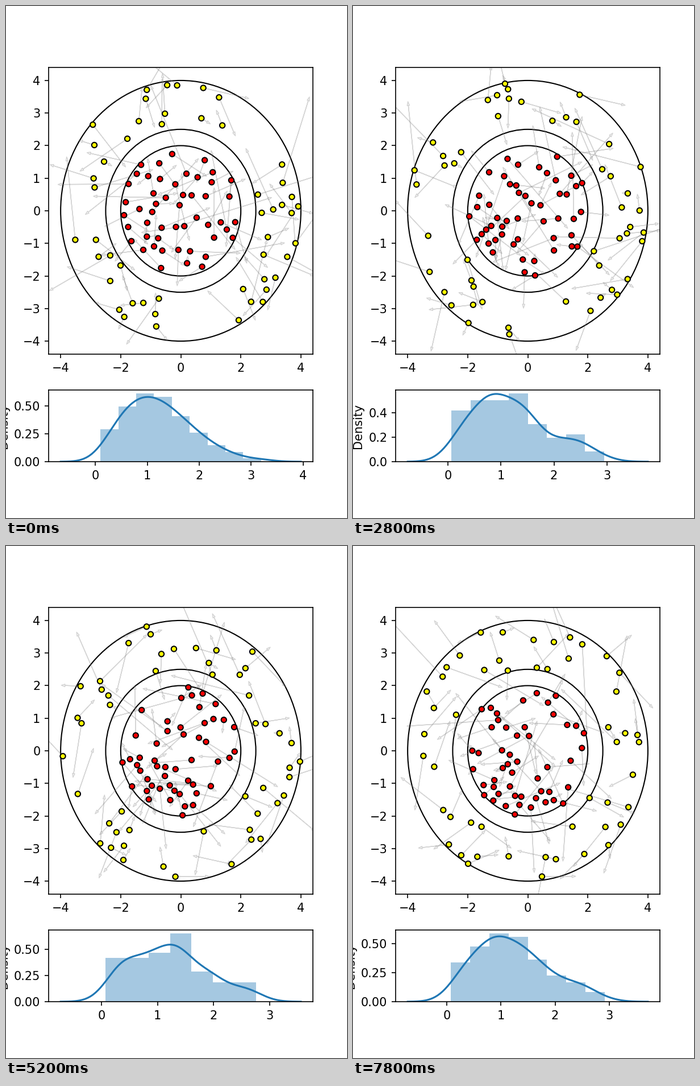
These frames come from a looping animation (600x900 px, 8 s). A matplotlib script:

```python
import numpy as np
import matplotlib.pyplot as plt
from matplotlib.animation import FuncAnimation
from matplotlib.collections import PolyCollection

FRAMES, INTERVAL = 40, 200
DT, SUBSTEPS = 0.05, 4
INNER, GAP, OUTER = 2.0, 2.5, 4.0
DIAMETER, SPACING = 0.2, 0.27
SPREAD = 0.98                       # speed scale of the gas
N_RED = 50
# Start sectors of the yellow gas: from angle, to angle, count.
SECTORS = [(-62, 35, 20), (45, 112, 10), (115, 170, 7), (194, 262, 13)]


def scatter_ring(rng, count, r_min, r_max, start=0, stop=360):
    """Spread points evenly over a ring sector, none too close together."""
    points = []
    while len(points) < count:
        r = np.sqrt(rng.uniform(r_min ** 2, r_max ** 2))
        a = np.radians(rng.uniform(start, stop))
        p = r * np.array([np.cos(a), np.sin(a)])
        if all(np.hypot(*(p - q)) > SPACING for q in points):
            points.append(p)
    return points


def start_state():
    rng = np.random.default_rng(4)
    points = scatter_ring(rng, N_RED, 0, 1.95)
    for start, stop, count in SECTORS:
        points += scatter_ring(rng, count, 2.55, 3.95, start, stop)
    pos = np.array(points)
    n = len(pos)
    # Evenly spaced quantiles of the Maxwell speed law in two dimensions.
    level = (rng.permutation(n) + 0.5) / n
    speed = SPREAD * np.sqrt(-2 * np.log(1 - level))
    heading = rng.uniform(0, 2 * np.pi, n)
    vel = speed[:, None] * np.stack([np.cos(heading), np.sin(heading)], axis=1)
    return pos, vel


def bounce_walls(pos, vel):
    r = np.hypot(*pos.T)
    normal = pos / r[:, None]
    radial = (vel * normal).sum(axis=1)
    red = np.arange(len(pos)) < N_RED
    leaving = (r > np.where(red, INNER, OUTER)) & (radial > 0)
    entering = ~red & (r < GAP) & (radial < 0)
    hit = leaving | entering
    vel[hit] -= 2 * radial[hit, None] * normal[hit]


def collide(pos, vel):
    diff = pos[:, None] - pos[None]
    dist = np.hypot(diff[..., 0], diff[..., 1])
    for i, j in np.argwhere(np.triu(dist < DIAMETER, 1)):
        normal = diff[i, j] / dist[i, j]
        closing = np.dot(vel[i] - vel[j], normal)
        if closing < 0:
            vel[i] -= closing * normal
            vel[j] += closing * normal


def simulate():
    pos, vel = start_state()
    states = []
    for _ in range(FRAMES):
        states.append((pos.copy(), vel.copy()))
        for _ in range(SUBSTEPS):
            pos += vel * DT / SUBSTEPS
            bounce_walls(pos, vel)
            collide(pos, vel)
    return states


def arrow_shapes(pos, vel, width=0.08, length=0.12):
    unit = vel / np.hypot(*vel.T)[:, None]
    side = unit[:, ::-1] * [-1, 1] * width / 2
    neck = pos + vel
    points = [pos, neck, neck + side, neck + unit * length, neck - side, neck]
    return np.stack(points, axis=1)


def bin_count(x):
    q1, q3 = np.percentile(x, [25, 75])
    width = 2 * (q3 - q1) / len(x) ** (1 / 3)
    return int(np.ceil(np.ptp(x) / width))


def density(x):
    bw = x.std(ddof=1) * len(x) ** -0.2
    grid = np.linspace(x.min() - 3 * bw, x.max() + 3 * bw, 200)
    z = (grid[:, None] - x) / bw
    return grid, np.exp(-z ** 2 / 2).mean(axis=1) / (bw * np.sqrt(2 * np.pi))


states = simulate()
fig, (ax, hist_ax) = plt.subplots(
    2, 1, figsize=(4, 6), dpi=150, gridspec_kw={"height_ratios": [4, 1]})

ax.set(xlim=(-4.4, 4.4), ylim=(-4.4, 4.4),
       xticks=range(-4, 5, 2), yticks=range(-4, 5))
for radius in (INNER, GAP, OUTER):
    ax.add_patch(plt.Circle((0, 0), radius, fill=False, lw=1))
arrows = PolyCollection([], facecolors=(0.5, 0.5, 0.5, 0.05),
                        edgecolors=(0.5, 0.5, 0.5, 0.32), linewidths=0.7)
ax.add_collection(arrows, autolim=False)
first = states[0][0]
dots = ax.scatter(*first.T, s=20, edgecolors="black", linewidths=1, zorder=2,
                  c=["red"] * N_RED + ["yellow"] * (len(first) - N_RED))


def draw(frame):
    pos, vel = states[frame]
    dots.set_offsets(pos)
    arrows.set_verts(arrow_shapes(pos, vel))

    speed = np.hypot(*vel.T)
    hist_ax.clear()
    hist_ax.hist(speed, bins=bin_count(speed), density=True,
                 color="C0", alpha=0.4)
    hist_ax.plot(*density(speed), color="C0", lw=1.5)
    hist_ax.set_ylim(bottom=0)
    hist_ax.set_ylabel("Density")
    return ()


anim = FuncAnimation(fig, draw, frames=FRAMES, interval=INTERVAL,
                     init_func=lambda: draw(0), repeat=True, repeat_delay=0)
plt.show()
```
